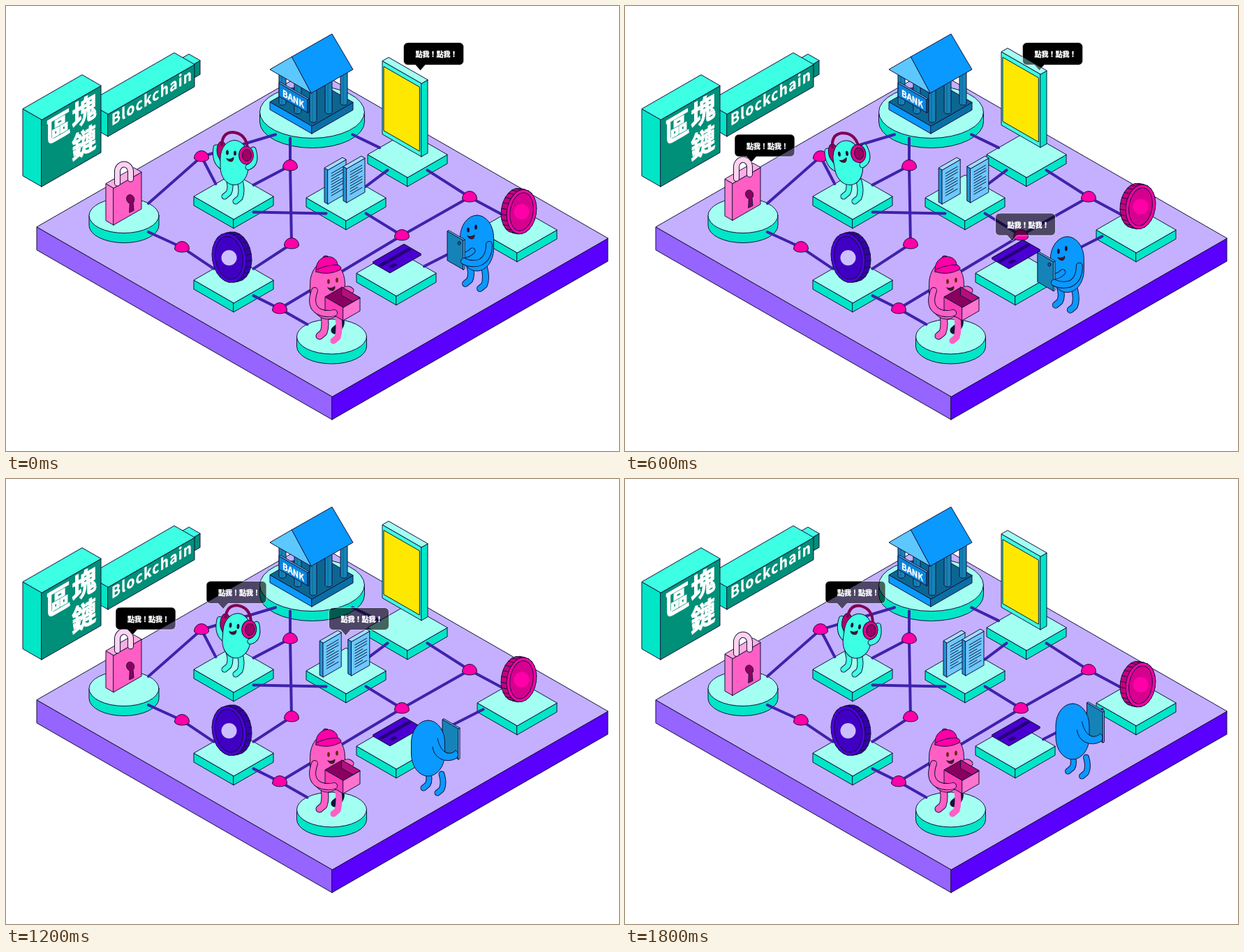
An HTML page that plays this animation: 878x638 px, repeating every 2.1 s.

```html
<!DOCTYPE html>
<html lang="zh-Hant">
<head>
<meta charset="utf-8">
<title>Blockchain</title>
<style>
  html, body { margin: 0; width: 100%; height: 100%; overflow: hidden; background: #fff; }
  svg { display: block; width: 878px; height: 638px; stroke: #14123a; stroke-linejoin: round; stroke-linecap: round; }
  text { fill: #fff; stroke: #fff; stroke-width: .4; font-family: "Noto Sans CJK TC", "Noto Sans CJK", "Noto Sans", sans-serif; font-weight: 900; }
  .mid { text-anchor: middle; dominant-baseline: central; }
  .bare { stroke: none; }
</style>
</head>
<body>
<svg id="stage" viewBox="0 0 878 638"></svg>
<script>
const STEP = 300, STEPS = 7, SLOPE = .575;
const TEAL = '#3dffe3', MINT = '#a3fff2', SEA = '#00e6c6', PINE = '#008f78';
const HOT = '#ff00a8', PINK = '#ff5fc4', PLUM = '#8a0060';
const BLUE = '#0a99ff', SKY = '#5cc8ff', STEEL = '#1583b8', DEEP = '#0b6792';
const VIOLET = '#4a00d2', NIGHT = '#26007a', INK = '#14123a';

// ---------- basic shapes ----------
const path = (d, fill = 'none', more = '') => `<path d="${d}" fill="${fill}" ${more}/>`;
const oval = (x, y, rx, ry, fill, more = '') =>
  `<ellipse cx="${x}" cy="${y}" rx="${rx}" ry="${ry}" fill="${fill}" ${more}/>`;
const group = (id, body) => `<g id="${id}">${body}</g>`;
const tube = (d, color, w = 10) =>
  path(d, 'none', `stroke-width="${w}"`) + path(d, 'none', `stroke="${color}" stroke-width="${w - 2}"`);
const slanted = (str, x, y, dir, size, more = '') =>
  `<text transform="matrix(.866 ${dir * .5} 0 1 ${x} ${y})" font-size="${size}" ${more}>${str}</text>`;

// Isometric faces, all measured from the nearest top corner.
const leftFace = (x, y, a, h, fill) => path(`M${x} ${y}l${-a} ${-a * SLOPE}v${h}l${a} ${a * SLOPE}z`, fill);
const rightFace = (x, y, b, h, fill) => path(`M${x} ${y}l${b} ${-b * SLOPE}v${h}l${-b} ${b * SLOPE}z`, fill);
const topFace = (x, y, a, b, fill, more) =>
  path(`M${x} ${y}l${-a} ${-a * SLOPE}l${b} ${-b * SLOPE}l${a} ${a * SLOPE}z`, fill, more);
const box = (x, y, a, b, h, top, left, right) =>
  leftFace(x, y, a, h, left) + rightFace(x, y, b, h, right) + topFace(x, y, a, b, top);

// ---------- stands and links ----------
const stand = (x, y, w, round) => ({ x, y, w, round, h: w * (round ? .5 : SLOPE) });
const tile = (x, y) => stand(x, y, 57, false);
const bankAt = stand(438.5, 152, 75, true), lockAt = stand(169, 300.5, 50, true), porterAt = stand(466.5, 474, 50, true);
const listenAt = tile(326, 273), docsAt = tile(487, 275), posterAt = tile(575, 213);
const violetAt = tile(326, 393), cardAt = tile(559, 383), hotAt = tile(732, 321);
const stands = [bankAt, lockAt, porterAt, listenAt, docsAt, posterAt, violetAt, cardAt, hotAt];

const drawStand = ({ x, y, w, h, round }) => round
  ? path(`M${x - w} ${y}v14a${w} ${h} 0 0 0 ${2 * w} 0v-14z`, SEA) + oval(x, y, w, h, MINT)
  : box(x, y + h, w, w, 13, MINT, SEA, SEA);

// A point on the rim of a stand, dx and dy being -1 or 1 for the middle of a side.
function port(s, dx, dy) {
  const f = s.round ? .7 : .5;
  return [s.x + f * s.w * dx, s.y + f * s.h * dy + (dy > 0 ? 6 : 0)];
}

const north = [280, 216], center = [407, 229], south = [409, 341], west = [252, 346];
const low = [392, 434], mid = [567, 329], east = [664, 274];
const hubs = [north, center, south, west, low, mid, east];
const links = [
  [port(lockAt, 1, -1), north, port(bankAt, -1, 1)],
  [north, port(listenAt, -.9, -1.1)],
  [port(bankAt, -.6, 1.2), center, south, port(violetAt, 1, -1)],
  [port(listenAt, 1, -1), center],
  [port(listenAt, 1, 1), port(docsAt, -1, 1)],
  [port(lockAt, 1, 1), west, port(violetAt, -1, -1)],
  [port(violetAt, 1, 1), low, port(porterAt, -1, -1)],
  [low, mid, east],
  [port(docsAt, 1, 1), mid],
  [port(bankAt, 1.1, 1), port(posterAt, -1.4, -.6)],
  [port(posterAt, -1, 1), port(docsAt, 1, -1)],
  [port(posterAt, 1, 1), east, port(hotAt, -.7, -1.3)],
  [port(cardAt, 1.4, -.6), port(hotAt, -1.7, .2)],
];
const drawLink = pts => path('M' + pts.join('L'), 'none', 'stroke="#3f22ab" stroke-width="4"');
const dome = ([x, y]) => path(`M${x - 10.5} ${y + 2}a10.5 10.5 0 0 1 21 0a10.5 5 0 0 1 -21 0z`, HOT);

// ---------- objects ----------
const title =
  box(266, 85, 16, 12, 20, TEAL, SEA, PINE) + box(146, 155, 29, 124, 32, TEAL, SEA, PINE) +
  box(51, 163, 27, 85, 96, TEAL, SEA, PINE) +
  ['區', '塊', '鏈'].map((ch, i) =>
    slanted(ch, i ? 112 : 75, i ? 103 + 45 * i : 171, -1, 41, 'class="mid" style="stroke-width:1.2"')).join('') +
  slanted('Blockchain', 151, 172, -1, 22, 'style="font-weight:700;letter-spacing:1.5px"');

const board = box(467, 560, 423, 395, 33, '#c4b0ff', '#9664ff', '#5a00ff');

function pillar(dx, i) {
  const x = 440 + dx * 22 * i, foot = 164 - 12.4 * i;
  return path(`M${x - 5} ${foot - 43}v43a5 3 0 0 0 10 0v-43z`, STEEL) + path(`M${x - 1} ${foot - 40}v42`, 'none', `stroke="${DEEP}"`);
}
const bank =
  box(438, 172, 60, 59, 11, DEEP, BLUE, '#0a6fa5') +
  [2, 1].map(i => pillar(-1, i) + pillar(1, i)).join('') + pillar(1, 0) +
  path('M409 73l58 -33l30 51l-60 34z', BLUE) + path('M409 73l-31 18l59 34z', SKY) +
  box(432, 134, 41, 2, 19, SKY, '#0a84dc', DEEP) +
  slanted('BANK', 411.5, 132.5, 1, 13, 'class="mid" style="font-weight:700"');

const poster = box(595, 111, 56, 9, 105, MINT, TEAL, SEA) + leftFace(592, 116, 51, 92, '#ffe800');

const lock =
  box(154, 261, 11, 40, 53, '#ffade0', '#ff7fd0', PINK) +
  tube('M159.5 254v-16a9.5 10.5 0 0 1 19 -1v11', '#ffd3ef', 9) +
  path('M177 283a5.5 6.5 -20 1 1 5 -1l1 11l-6 3z', PLUM);

function sheet(x, y) {
  let out = box(x, y, 5, 26, 49, '#a6dcff', '#2196d6', '#6cc8ff');
  for (let i = 0; i < 9; i++) {
    const w = i % 4 === 3 ? 11 : 17;
    out += path(`M${x + 5} ${y + 5 + i * 4}l${w} ${-w * SLOPE}`);
  }
  return out;
}

const card =
  topFace(550, 381, 23, 43, VIOLET, 'stroke-width="4"') + topFace(550, 381, 23, 43, VIOLET, `stroke="${VIOLET}" stroke-width="2"`) +
  topFace(538, 374, 5, 43, NIGHT, 'class="bare"') + topFace(553, 376, 5, 8, NIGHT, 'class="bare"');

// dir 1 faces left, -1 faces right
function coin(x, y, rx, ry, dir, edge, face, inner, mark) {
  const disc = (i, cut, fill, more = '') => {
    const cx = x + dir * i, cy = y - i * .2;
    return oval(cx, cy, rx - cut, ry - cut, fill, `transform="rotate(${-dir * 9} ${cx} ${cy})" ${more}`);
  };
  let out = disc(8, 0, edge);
  for (let i = 7; i > 0; i--) out += disc(i, 0, edge, 'class="bare"');
  for (let a = 0; a < 24; a++) {
    const t = a * Math.PI / 12, u = rx * Math.cos(t), v = ry * Math.sin(t);
    out += path(`M${x + u + dir * .16 * v} ${y + v - dir * .16 * u}l${dir * 8} -1.6`);
  }
  return out + disc(0, 0, face) + disc(0, 4.5, inner) + `<circle cx="${x}" cy="${y}" r="11" fill="${mark}" class="bare"/>`;
}

// ---------- characters ----------
const bean = (x, y, w, h, color) =>
  `<rect x="${x - w}" y="${y - h}" width="${2 * w}" height="${2 * h}" rx="${w}" ry="${h * .8}" fill="${color}"/>`;
const leg = (x, y, h, color, w) => tube(`M${x} ${y}q4 ${h * .6} 0 ${h}l-6 5`, color, w);
const legs = (x, y, h, gap, color, w) => leg(x, y, h, color, w) + leg(x + gap, y + 3, h + 4, color, w);
const face = (x, y, gap, tilt, color) =>
  [0, 1].map(i => oval(x + gap * i, y - tilt * i, 1.9, 3.6, color, 'class="bare"')).join('') +
  path(`M${x - 1} ${y + 9}q5 2 10 -2q0 6 -4 6q-4 0 -6 -4z`, '#5a1616');

const listener =
  tube('M309 230q-11 -8 -8 -27', TEAL, 9) + oval(309, 207, 7, 13, '#b8006f') +
  bean(327, 224.5, 20, 32, TEAL) +
  path('M309 199q1 -18 16 -18q19 2 21 23', 'none', 'stroke="#7d0050" stroke-width="4"') +
  face(317, 210, 11, -1, INK) +
  tube('M347 231q13 -5 7 -25', TEAL, 9) +
  oval(344, 214, 10.5, 13, '#e0058f') + oval(345, 214, 6.5, 8.5, '#a00064');

const porter =
  legs(455, 440, 28, 20, PINK, 11).replace('475 443q4 19.2 0 32', '473 440q10 12 4 20') +
  bean(460.5, 407, 25, 42, PINK) + face(462, 395, 12, 2, '#6b2a12') +
  oval(458, 361, 4, 3, HOT) + path('M444 381C442 354 474 354 475 371q7 3 4 7q-17 9 -35 3z', HOT) + path('M445 378q14 -7 30 -7') +
  tube('M479 412q10 -10 15 -4', PINK, 9) +
  box(483, 432, 26, 24, 19, PLUM, '#ff3db5', '#ff74cf') + path('M481 403l26 15l-10 6l-16 -9z', '#b3107e') +
  tube('M442 408q-8 22 6 30q10 5 22 2', PINK);

const walkerFront =
  legs(664, 372, 21, 21, BLUE) + bean(674.5, 340, 24, 40, BLUE) + face(662, 321, 11, 4, INK) +
  tube('M668 351q-6 6 -13 6', BLUE, 9) +
  box(655, 336, 23, 2, 42, SKY, STEEL, SKY) + oval(649, 340, 2, 2.5, DEEP) +
  tube('M692 342q0 20 -14 26q-12 3 -22 -2', BLUE);

const walkerBack =
  box(648, 358, 23, 2, 44, SKY, STEEL, SKY) + legs(604, 420, 18, 20, BLUE, 9) + bean(604.5, 386, 24, 40, BLUE) +
  path('M618 372q4 18 14 21q8 1 12 -4q6 4 2 11q-12 7 -24 1q-10 -6 -11 -17', BLUE);

// ---------- speech bubbles ----------
// Each opens one step after the one before and stays three steps.
const bubbles = [[569.5, 52.5], [530.5, 297], [157, 184], [462.5, 184.5], [287, 146.5]];
const bubbleShape = (x, y) =>
  `M${x + 6} ${y}h74a6 6 0 0 1 6 6v20a6 6 0 0 1 -6 6h-49l-7 8l-7 -8h-11a6 6 0 0 1 -6 -6v-20a6 6 0 0 1 6 -6z`;
const bubbleBack = ([x, y], i) => group('back' + i, path(bubbleShape(x, y), '#000', 'class="bare"'));
const bubbleFront = ([x, y], i) => group('bubble' + i,
  path(bubbleShape(x, y), 'rgba(0,0,0,.6)', 'stroke="rgba(255,255,255,.6)"') +
  `<text x="${x + 17}" y="${y + 16}" font-size="10" dominant-baseline="central">點我！點我！</text>`);

const stage = document.getElementById('stage');
stage.innerHTML =
  bubbles.map(bubbleBack).join('') + title + board +
  stands.map(drawStand).join('') + links.map(drawLink).join('') + hubs.map(dome).join('') + bank +
  group('poster', poster) + group('lock', lock) +
  group('left', sheet(461, 235)) + group('right', sheet(488, 233)) +
  coin(319.5, 361, 24, 35.5, 1, '#3600ae', '#4c00e0', '#4000c4', '#cdbfff') +
  group('coin', coin(738.5, 295, 21, 32, -1, '#c4007f', HOT, '#d6008e', HOT)) +
  group('card', card) + legs(319, 248, 20, 16, TEAL, 9) + group('listener', listener) + porter +
  group('front', walkerFront) + group('behind', walkerBack) +
  bubbles.map(bubbleFront).join('');

// ---------- motion ----------
const peak = (k, top) => Math.max(0, top - Math.abs(k - top));
const wave = (k, turns) => Math.sin(turns * 2 * Math.PI * k / STEPS);

const part = id => document.getElementById(id);
const move = (id, x, y) => part(id).setAttribute('transform', `translate(${x} ${y})`);
const show = (id, on) => part(id).setAttribute('visibility', on ? 'visible' : 'hidden');
const walk = (id, p, dx, dy) => move(id, dx * p ** 1.2, dy * p);

function pose(k) {
  const up = peak(k, 3), coming = k < 4;
  move('poster', 0, -6.6 * up);
  move('coin', 0, -3.6 * up);
  move('left', -3.4 * up, 0);
  move('right', 3.4 * up, 0);
  move('lock', 0, -8.5 * wave(k, .5));
  move('card', 0, -3 * peak(k, 2));
  part('listener').setAttribute('transform', `rotate(${-10 * wave(k, 1)} 325 270)`);
  if (coming) walk('front', k / 3, -67, 46);
  else walk('behind', (k - 4) / 2, 36.5, -24);
  show('front', coming);
  show('behind', !coming);
  bubbles.forEach((_, i) => {
    const on = k >= i && k < i + 3;
    show('back' + i, on);
    show('bubble' + i, on);
  });
}

let last = -1;
function tick(now) {
  const k = Math.floor(now / STEP) % STEPS;
  if (k !== last) pose(last = k);
  requestAnimationFrame(tick);
}
pose(0);
requestAnimationFrame(tick);
</script>
</body>
</html>
```
